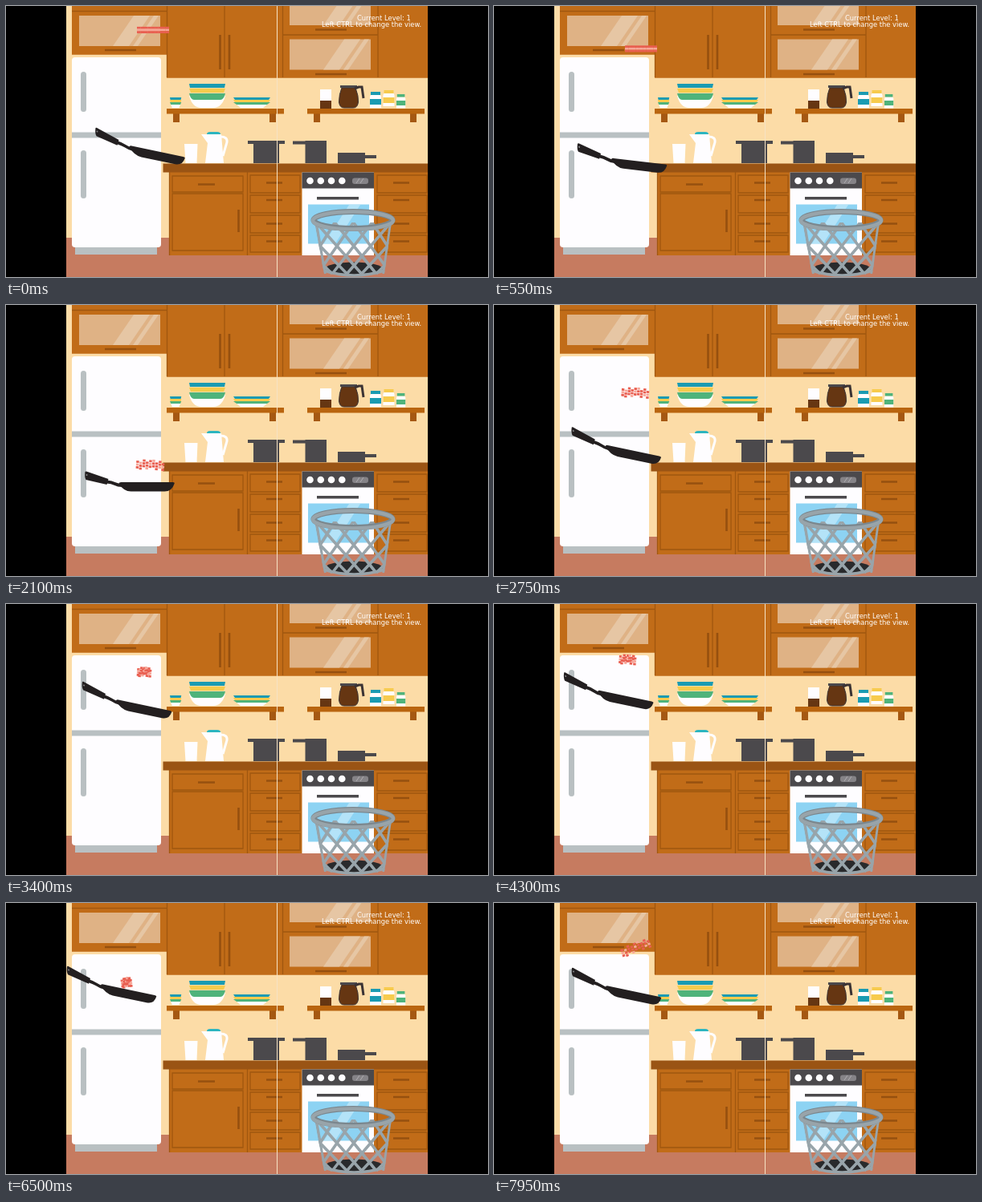
An HTML page that plays this animation: 600x338 px, repeating every 8000 ms.

```html
<!DOCTYPE html>
<html lang="en">
<head>
<meta charset="utf-8">
<title>Kitchen toss</title>
<style>
html, body { margin: 0; width: 100%; height: 100%; overflow: hidden; background: #000; }
svg { display: block; width: 600px; height: 338px; }
text { font: 8.36px "DejaVu Sans", sans-serif; fill: #fff; }
.wood { fill: #c16c18; }
.line { fill: none; stroke: #a0570f; stroke-width: 1.3; }
.knob { fill: none; stroke: #96500f; stroke-width: 2.6; }
.glass { fill: #dfb285; }
.shine { fill: #e6c6a4; }
.white { fill: #fefdff; }
.grey { fill: #b9c0c2; }
.dark { fill: #4b494c; }
.grip { fill: none; stroke: #4b494c; stroke-width: 4; }
.teal { fill: #1a9bb2; }
.yellow { fill: #f7cb4d; }
.green { fill: #4fb37b; }
.brown { fill: #663612; }
.wire { fill: none; stroke: #98a4aa; stroke-width: 3.6; }
</style>
</head>
<body>
<svg viewBox="0 0 600 338">
  <defs>
    <clipPath id="room"><path d="M75 0h450v338H75z"/></clipPath>
    <clipPath id="bin"><path d="M384 270H480L471 334Q433 342 396 334Z"/></clipPath>
    <g id="pane">
      <path class="glass" d="M0 0h101v38H0z"/>
      <path class="shine" d="M42 38L68 0h20L62 38zM67 38L93 0h6L73 38z"/>
    </g>
    <g id="shelf">
      <path fill="#a55812" d="M8 6h8v11H8zM128 6h8v11h-8z"/>
      <path fill="#b9650f" d="M0 0h146v6.500H0z"/>
    </g>
    <g id="drawers">
      <path class="line" d="M3 211h62v22H3zM3 236h62v22H3zM3 261h62v22H3zM3 286h62v21H3z"/>
      <path class="knob" d="M23 220.500h20M23 242h20M23 271.500h20M23 293.500h20"/>
    </g>
    <g id="jar">
      <path class="white" d="M1 4h12l1 2v14H0V6z"/>
      <path d="M1 0h12v4H1zM0 9h14v7H0z"/>
    </g>
    <g id="plates">
      <path class="white" d="M3 8h40l-6 5H9z"/>
      <path class="teal" d="M0 0h46l-2 3H2z"/>
      <path class="yellow" d="M0 3h46l-2 3H2z"/>
      <path class="green" d="M0 6h46l-4 3H4z"/>
    </g>
  </defs>

  <g clip-path="url(#room)">
    <path fill="#fcdca7" d="M75 0h450v290H75z"/>
    <path fill="#c67b60" d="M75 289h450v49H75z"/>

    <!-- upper cabinets -->
    <path class="wood" d="M82 0H525V89.700H200V60.700H82z"/>
    <path class="line" d="M82 6.500H200M200.500 0V89M272 0V89M344.500 0V89M463 0V89M344 36H463"/>
    <path class="knob" d="M123 55h39M266.500 36v43M278 36v43M385 29.500h39M385 85h39"/>
    <use href="#pane" x="91" y="12"/>
    <use href="#pane" x="353" y="-14"/>
    <use href="#pane" x="353" y="41.500"/>

    <!-- fridge -->
    <path class="grey" d="M86 299h102v11H86z"/>
    <rect class="white" x="82" y="64" width="111" height="237" rx="4"/>
    <path class="grey" d="M82 157.500h111v7H82z"/>
    <rect class="grey" x="93" y="82" width="7" height="50" rx="3.500"/>
    <rect class="grey" x="93" y="180" width="7" height="60" rx="3.500"/>

    <!-- shelves and crockery -->
    <use href="#shelf" x="200" y="128"/>
    <use href="#shelf" x="375" y="128"/>
    <use href="#plates" x="283" y="114"/>
    <use href="#plates" transform="translate(204 114) scale(.31 1)"/>
    <path class="white" d="M228 112h45q-4 15-15 15h-15q-11 0-15-15z"/>
    <path class="teal" d="M228 97h45l-1 5h-43z"/>
    <path class="yellow" d="M228 103h45l-2 5h-41z"/>
    <path class="green" d="M228 109h45q-2 8-6 8h-33q-4 0-6-8z"/>
    <path class="white" d="M391 104h14v15h-14z"/>
    <path class="brown" d="M391 118h14v10h-14z"/>
    <path class="brown" stroke="#3b3334" d="M418 102h17q4 10 3.500 18q-1 7-6 7h-12q-5 0-6-7q0-10 3.500-18z"/>
    <path class="dark" d="M416 99h21v3h-21z"/>
    <path fill="none" stroke="#3b3334" stroke-width="3" d="M434 103l5-2h4l2 14"/>
    <use href="#jar" x="453" y="107" class="teal"/>
    <use href="#jar" x="469.500" y="105" class="yellow"/>
    <use href="#jar" class="green" transform="translate(486 110) scale(.8 .88)"/>

    <!-- lower cabinets -->
    <path class="wood" d="M203 206H525V311H203z"/>
    <path class="line" d="M207 212h88v20h-88zM207 234h88v71h-88zM300.500 207V311M203.500 207V311"/>
    <path class="knob" d="M239 222.500h21M289.500 254v28"/>
    <use href="#drawers" x="301"/>
    <use href="#drawers" x="459"/>
    <path fill="#9a5414" d="M195.500 196.500H525v11H195.500z"/>

    <!-- worktop -->
    <path class="white" d="M222 172h16.500l-1 24h-14z"/>
    <path class="white" d="M243 160H268L271 196H248L251 171z"/>
    <path fill="none" stroke="#fefdff" stroke-width="3" d="M267 163q9 0 8 7l-5 17"/>
    <path fill="#2cb5c0" d="M250 160q0-3 4-3h9q4 0 4 3z"/>
    <path class="dark" d="M308 168h32v28h-32zM372.500 168h26.500v28h-26.500zM413 183h34v13h-34z"/>
    <path class="grip" d="M301 170h46M357 170.500h16M446 188h15"/>

    <!-- oven -->
    <path class="white" d="M368.500 207.500h89.500V311h-89.500z"/>
    <path class="dark" d="M368.500 207.500h89.500v20h-89.500zM387 238h52v3.500h-52z"/>
    <path stroke="#fefdff" stroke-width="8.600" stroke-linecap="round" stroke-dasharray="0 13.260" d="M378.500 218h40"/>
    <rect x="431" y="214.500" width="20" height="7.500" rx="3" fill="#858387"/>
    <path stroke="#b0aeb2" d="M436 221l4-6M441 221l4-6"/>
    <path fill="#8dd3f3" d="M376 247.500h76v49h-76z"/>
    <path fill="#b4e3f8" d="M396 296l31-48h14l-31 48z"/>

    <!-- bin -->
    <ellipse cx="433" cy="328" rx="36" ry="8.500" fill="#292a2c"/>
    <g clip-path="url(#bin)">
      <path id="mesh" class="wire"/>
      <path class="wire" d="M386 270L397 334M479 270L470 334"/>
    </g>
    <path class="wire" d="M396 330Q433 342 471 330"/>
    <ellipse cx="432" cy="267" rx="49" ry="10.500" fill="none" stroke="#7b878e" stroke-width="7"/>
    <ellipse cx="432" cy="267.500" rx="50" ry="11" fill="none" stroke="#98a4aa" stroke-width="4.500"/>
    <path fill="#f6e3c4" d="M337 0h1v338h-1z"/>
  </g>

  <g id="pan" fill="#231f20">
    <path d="M0-4Q1-5 3-4L29 5L27 12L1 6Q-1 3 0-4z"/>
    <path fill="none" stroke="#231f20" stroke-width="4" d="M27 8.500Q33 9 37 11T46 13"/>
    <path d="M42 11Q42 9 45 9H109Q112 9 111 11Q108 20.500 99 20.500H57Q48 20.500 42 11z"/>
    <circle cx="2" cy="0" r="1" fill="#8a8a8c"/>
  </g>
  <g id="bacon"></g>
  <text x="437" y="17.700">Current Level: 1</text>
  <text x="393" y="26.200">Left CTRL to change the view.</text>
</svg>
<script>
const LOOP = 8, FPS = 20, GRAVITY = 155, COLS = 9, ROWS = 3;
const $ = id => document.getElementById(id);

// Key points as [seconds, x, y]: where the pan is led, and where the bacon bounces.
const poses = [
  [0, 111.5, 156], [1.15, 95.5, 198], [2.1, 98.5, 212], [3.4, 95, 101], [5.15, 80, 79],
  [5.57, 77, 55], [5.95, 76, 83], [6.85, 76, 83], [7.95, 97, 85]
];
const bounces = [
  [-1.49, 183, 202], [1.49, 183, 202], [2.03, 180, 213], [3.94, 169, 114],
  [5.57, 157, 71], [6.5, 150, 99], [7.1, 155, 105], [8.7, 195, 105]
];
const COOKED = bounces[1][0];

const mix = (a, b, u) => a + (b - a) * u;
const clamp = u => Math.min(1, Math.max(0, u));
const smooth = u => u * u * (3 - 2 * u);

function span(keys, t) {
  const i = Math.max(1, keys.findIndex(k => k[0] > t));
  return [keys[i - 1], keys[i]];
}

function panAt(t) {
  const [a, b] = span(poses, Math.min(t, 7.949));
  const u = smooth((t - a[0]) / (b[0] - a[0]));
  const y = mix(a[2], b[2], clamp(u));
  return { x: mix(a[1], b[1], clamp(u)), y, tilt: .21 * clamp((198 - y) / 40) };
}

// Free fall between two bounces; the strip leans into its sideways speed.
function baconAt(t) {
  const [a, b] = span(bounces, t);
  const u = (t - a[0]) / (b[0] - a[0]);
  const wobble = Math.cos(2 * Math.PI * (t - 5.15) / 2.75);
  const cooked = clamp((t - COOKED) * 4);
  return {
    x: mix(a[1], b[1], u),
    y: mix(a[2], b[2], u) - GRAVITY / 2 * (t - a[0]) * (b[0] - t),
    angle: -.8 * (b[1] - a[1]) / (b[0] - a[0]) * cooked,
    width: mix(40, 26 + 12 * wobble, cooked),
    cooked
  };
}

// Two mirrored families of strands, narrowing towards the base.
let mesh = "";
for (let a = -.75; a <= 1.75; a += .25) {
  for (const s of [-.625, .625]) mesh += `M${386 + a * 93} 270L${397 + (a + s) * 73} 334`;
}
$("mesh").setAttribute("d", mesh);

const cells = Array.from({ length: COLS * ROWS }, () =>
  $("bacon").appendChild(document.createElementNS("http://www.w3.org/2000/svg", "rect")));

function drawBacon({ x, y, angle, width, cooked }) {
  $("bacon").setAttribute("transform", `translate(${x} ${y}) rotate(${angle})`);
  const w = mix(4.6, 3.4, cooked), pitch = (width - w) / (COLS - 1);
  cells.forEach((cell, n) => {
    const col = n % COLS, row = Math.floor(n / COLS);
    const wave = cooked * (Math.sin(col * 2.4) * 1.7 + Math.sin(col * .8 + 1));
    const light = cooked ? (col + row) % 4 === 1 : row === 1;
    cell.setAttribute("x", (col - (COLS - 1) / 2) * pitch - w / 2);
    cell.setAttribute("y", (row - 1) * mix(2.7, 3.5, cooked) - 1.4 + wave);
    cell.setAttribute("width", w);
    cell.setAttribute("height", 2.8);
    cell.setAttribute("fill", light ? "#f7a698" : "#e95f51");
  });
}

function draw(t) {
  const pan = panAt(t);
  $("pan").setAttribute("transform", `matrix(1 ${pan.tilt} 0 1 ${pan.x} ${pan.y})`);
  drawBacon(baconAt(t));
}

const start = performance.now();
function tick() {
  const t = (performance.now() - start) / 1000 % LOOP;
  draw(Math.floor(t * FPS) / FPS);
  requestAnimationFrame(tick);
}
tick();
</script>
</body>
</html>
```
